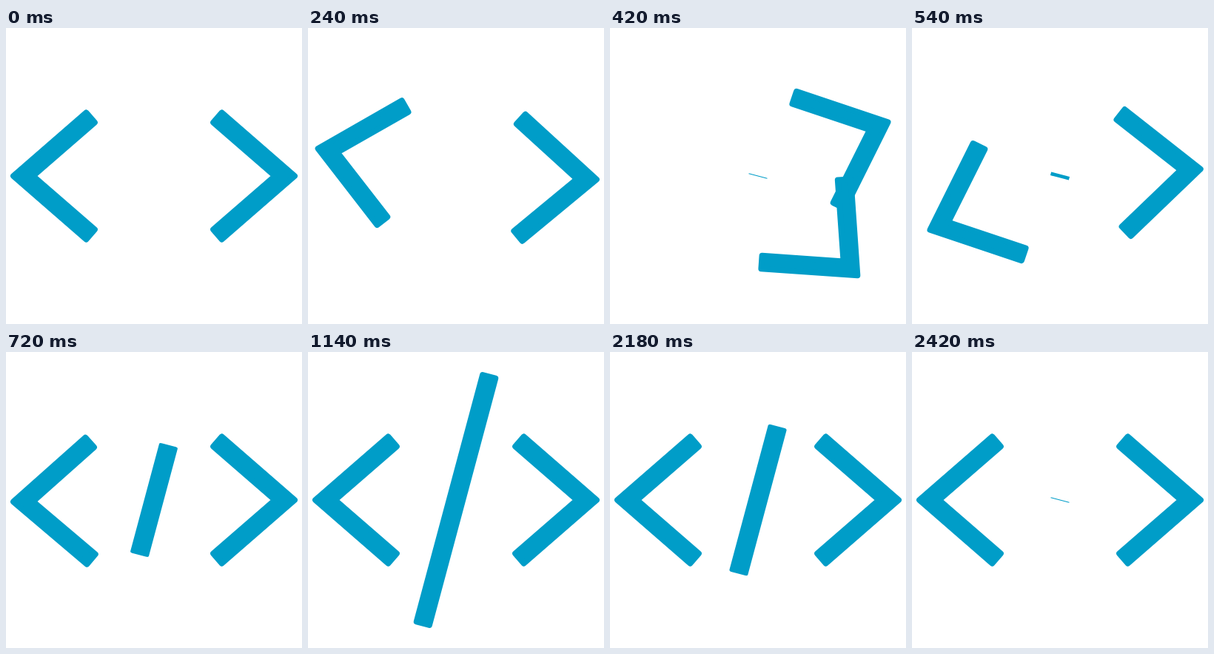
An HTML page that plays this animation: 400 by 400 pixels, repeating every 2480 ms.

```html
<!DOCTYPE html>
<html lang="en">
<head>
<meta charset="utf-8">
<title>Code mark</title>
<style>
  html, body { margin: 0; width: 100%; height: 100%; overflow: hidden; background: #fff; }
  svg { display: block; width: 100%; height: 100%; }
  .bracket { stroke: #009dc8; stroke-width: 8; stroke-linejoin: round; }
</style>
</head>
<body>
<svg viewBox="0 0 400 400" fill="#009dc8">
  <defs>
    <path id="chevron" class="bracket" d="M10 200 108.3 114.5 119.8 127.7 36.5 200 119.8 272.3 108.3 285.5Z"/>
  </defs>
  <g id="left"><use href="#chevron"/></g>
  <g id="right"><use href="#chevron" transform="rotate(180 200 200)"/></g>
  <g transform="translate(200 200) rotate(15)">
    <rect id="slash" x="-12.9" y="-176.5" width="25.8" height="353" rx="4"/>
  </g>
</svg>
<script>
const LOOP = 2480, STEP = 60, HOLD = 1140, RESUME = 1940;
const SPIN = 20;           // ticks one move takes
const LENGTH = 353;
const [left, right, slash] = ['left', 'right', 'slash'].map(id => document.getElementById(id));

function expoInOut(p) {
  if (p <= 0) return 0;
  if (p >= 1) return 1;
  return p < 0.5 ? 2 ** (20 * p - 11) : 1 - 2 ** (9 - 20 * p);
}

// Motion advances in 60 ms steps and rests while the mark is complete.
function snap(ms) {
  if (ms < HOLD) return Math.floor(ms / STEP) * STEP;
  if (ms < RESUME) return HOLD;
  return RESUME + Math.floor((ms - RESUME) / STEP) * STEP;
}

function render(ms) {
  const time = snap(ms);
  const tick = Math.ceil(Math.floor(time / STEP) * 5 / 3);
  const move = delay => expoInOut((tick - delay) / SPIN);
  const turn = (el, delay) => el.setAttribute('transform', `rotate(${180 * move(delay)} 200 200)`);

  turn(left, 0);
  turn(right, 3);

  const size = time < RESUME ? move(10.2) : 1 - expoInOut((time - 1905) / 565);
  const scale = size > 0 ? Math.max(size, 1 / LENGTH) : 0;
  slash.setAttribute('transform', `scale(1 ${scale})`);
  slash.setAttribute('visibility', scale ? 'visible' : 'hidden');
}

const start = performance.now();
function loop() {
  render((performance.now() - start) % LOOP);
  requestAnimationFrame(loop);
}
loop();
</script>
</body>
</html>
```
